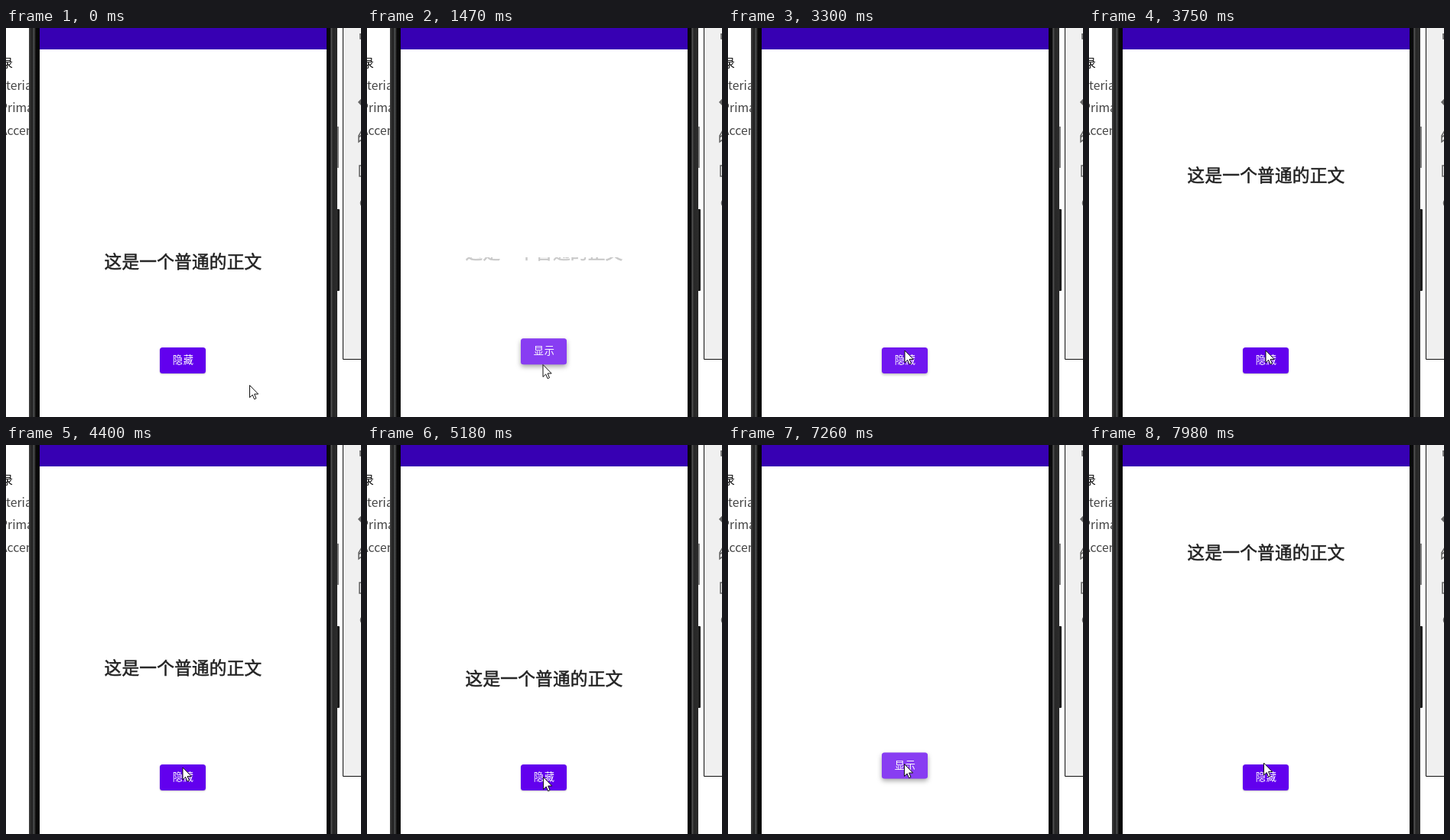
An HTML page for the animation above (8000 ms loop, 464 by 509 pixels).

```html
<!DOCTYPE html>
<html lang="zh-CN">
<head>
<meta charset="utf-8">
<style>
  html, body { margin: 0; width: 100%; height: 100%; overflow: hidden; background: #fff; }
  #stage { position: relative; width: 464px; height: 509px; overflow: hidden; background: #fff;
    font-family: "Noto Sans CJK SC", "Noto Sans CJK", sans-serif; }
  #stage > * { position: absolute; }
  .side { font-size: 15.8px; line-height: 20px; color: #444; white-space: nowrap; }
  .side.head { font-size: 14.5px; font-weight: 500; color: #111; }
  #clip { left: 128.5px; width: 210px; }
  #title { position: absolute; left: 0; bottom: 0; font-size: 22.7px; font-weight: 500; line-height: 31px;
    letter-spacing: .2px; white-space: nowrap; color: #222; -webkit-text-stroke: .55px #222; }
  #btn { left: 200.7px; top: 418px; width: 60.6px; height: 34px; border-radius: 3.5px; background: #6200ee; }
  #label { position: absolute; left: 17px; top: 0; font-size: 13.2px; font-weight: 500; line-height: 31px;
    letter-spacing: .8px; white-space: nowrap; color: #fff; }
  #ripple { position: absolute; inset: 0; border-radius: inherit; background: #fff; }
  #bar { left: 44px; top: 0; width: 375px; height: 28px; background: #3700b3; }
  svg { left: 0; top: 0; overflow: visible; }
</style>
</head>
<body>
<div id="stage">
  <div class="side head" style="right:455px;top:35px">目录</div>
  <div class="side" style="left:-21.5px;top:65px">Material</div>
  <div class="side" style="left:-8px;top:94px">Primary</div>
  <div class="side" style="left:-8px;top:124px">Accent</div>

  <svg width="464" height="509">
    <defs>
      <linearGradient id="left">
        <stop offset="0" stop-color="#444"/><stop offset=".1" stop-color="#333"/>
        <stop offset=".32" stop-color="#1f1f1f"/><stop offset=".42" stop-color="#4c4f50"/>
        <stop offset=".54" stop-color="#333"/><stop offset=".64" stop-color="#0a0a0a"/>
        <stop offset="1" stop-color="#050505"/>
      </linearGradient>
      <linearGradient id="right">
        <stop offset="0" stop-color="#050505"/><stop offset=".33" stop-color="#0b0b0c"/>
        <stop offset=".44" stop-color="#555"/><stop offset=".58" stop-color="#272727"/>
        <stop offset="1" stop-color="#2c2c2c"/>
      </linearGradient>
    </defs>
    <rect x="431" y="129" width="4" height="54" fill="#808080"/>
    <rect x="431" y="237" width="5" height="107" rx="1" fill="#1c1c1c"/>
    <rect x="30" width="14" height="509" fill="url(#left)"/>
    <rect x="44" width="375" height="509" fill="#fff"/>
    <rect x="419" width="14" height="509" fill="url(#right)"/>
    <path d="M440.5 -1V433.5H466V-1Z" fill="#f0f0f0" stroke="#111"/>
    <g fill="none" stroke="#666" stroke-width="1.6">
      <path d="M462 8H466M463 8V14H466"/>
      <path d="M461 97L466 92V102Z" fill="#666"/>
      <path d="M465 134L461 141V149L465 146M461 143L465 140"/>
      <path d="M466 180H462V194H466"/>
      <circle cx="469" cy="229" r="5.5"/>
    </g>
  </svg>

  <div id="clip"><div id="title">这是一个普通的正文</div></div>
  <div id="btn"><div id="ripple"></div><div id="label"></div></div>
  <div id="bar"></div>
  <svg id="cursor" width="14" height="21">
    <path d="M.5 .5V16.5L4.2 13L6.6 18.7L9 17.6L6.6 12H11.7Z" fill="#fff" stroke="#111"/>
  </svg>
</div>

<script>
const LOOP = 8000, SLIDE = 1500, DROP = 290, LINE = 31, RIPPLE = .24;
const $ = id => document.getElementById(id);
const [clip, title, btn, label, ripple, cursor] =
  ['clip', 'title', 'btn', 'label', 'ripple', 'cursor'].map($);

// Each click toggles the text: hide, show, hide, show
const clicks = [
  { down: 1040, toggle: 1335, up: 1500 },
  { down: 2480, toggle: 3290, up: 3175 },
  { down: 5630, toggle: 5850, up: 6157 },
  { down: 7050, toggle: 7690, up: 7600 }
];

// Pointer hops from its resting place
const rest = { x: 318, y: 467 };
const hops = [
  { from: 20, to: 400, x: 160, y: 405 },
  { from: 400, to: 800, x: 229.5, y: 440 },
  { from: 1930, to: 2170, x: 230.5, y: 421.5 },
  { from: 4980, to: 5240, x: 230, y: 436 },
  { from: 6380, to: 6680, x: 230, y: 417 },
  { from: 7850, to: 7980, x: 228, y: 415.5 }
];

const clamp = v => Math.min(1, Math.max(0, v));
const smooth = k => k * k * (3 - 2 * k);

// Critically damped spring, remaining distance
const spring = ms => { const w = ms * .02; return (1 + w) * Math.exp(-w); };

// cubic-bezier(0, 0, .2, 1)
function slowIn(x) {
  let lo = 0, hi = 1;
  for (let i = 0; i < 24; i++) {
    const s = (lo + hi) / 2;
    if (.6 * (1 - s) * s * s + s ** 3 < clamp(x)) lo = s; else hi = s;
  }
  return smooth(lo);
}

// Quick rise on press, fade after release
const pressure = (t, { down, up }) => Math.min(clamp((t - down) / 80), clamp(1 - (t - up) / 200));

function pointerAt(t) {
  let { x, y } = rest;
  for (const hop of hops) {
    const k = smooth(clamp((t - hop.from) / (hop.to - hop.from)));
    x += (hop.x - x) * k;
    y += (hop.y - y) * k;
  }
  return [x, y];
}

function draw(t) {
  const done = clicks.filter(c => c.toggle <= t);
  const shown = done.length % 2 === 0;
  const age = done.length ? t - done.at(-1).toggle : Infinity;
  const size = shown ? 1 : spring(age);
  const away = shown ? 1 - slowIn((age - 50) / SLIDE) : 0;
  const shift = (1 - size) * LINE / 2;

  clip.style.top = 288.5 + shift + 'px';
  clip.style.height = LINE * size + 'px';
  clip.style.overflow = shown ? 'visible' : 'hidden';
  clip.style.opacity = size < .01 ? 0 : size;
  title.style.transform = `translateY(${-DROP * away}px)`;

  const lift = Math.max(...clicks.map(c => pressure(t, c)));
  btn.style.transform = `translateY(${-shift}px)`;
  btn.style.boxShadow = `0 ${1 + 2 * lift}px ${2 + 4 * lift}px rgba(0,0,0,${.22 + .13 * lift})`;
  ripple.style.opacity = RIPPLE * lift;
  label.textContent = shown ? '隐藏' : '显示';

  const [x, y] = pointerAt(t);
  cursor.style.transform = `translate(${x}px, ${y}px)`;
}

const start = performance.now();
function tick() {
  draw((performance.now() - start) % LOOP);
  requestAnimationFrame(tick);
}
tick();
</script>
</body>
</html>
```
